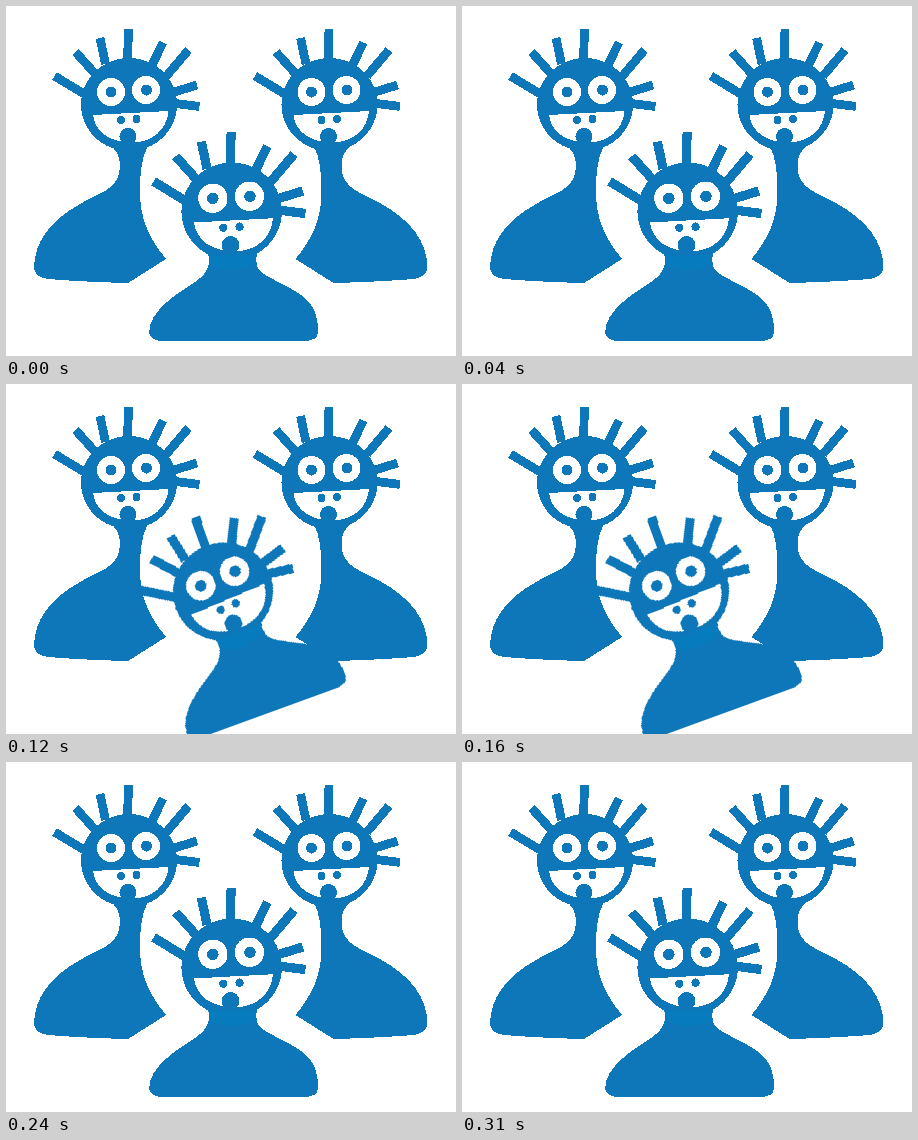
An HTML page without scripts for the animation above (360 ms loop, 450 px wide and 350 px high).

```html
<!DOCTYPE html>
<html lang="en">
<head>
<meta charset="utf-8">
<title>Three spiky friends</title>
<style>
  html, body { margin: 0; width: 100%; height: 100%; overflow: hidden; background: #fff; }
  svg { display: block; width: 450px; height: 350px; fill: #0d77b9; shape-rendering: crispEdges; }
  .hair { stroke: #0d77b9; stroke-width: 8.8; }
  .white { fill: #fff; }
  .throat { fill: #067bbd; }
  .rocker { transform-origin: 227.5px 231px; animation: rock 360ms step-end infinite; }
  @keyframes rock {
    0%, 66.667%, 100% { transform: rotate(0deg); }
    16.667%, 50% { transform: rotate(-10deg); }
    33.333% { transform: rotate(-20deg); }
  }
</style>
</head>
<body>
<svg viewBox="0 0 450 350">
  <defs>
    <g id="head">
      <path class="hair" d="M48.500 70L84 91.500M69.500 46L92 71M94 32L99.500 58M122.500 23L121.500 56M157 36.500L145 61M182.500 44L160.500 70M191 79L165 87M193.500 100.500L166 97"/>
      <ellipse cx="123" cy="98.500" rx="48" ry="46.500"/>
      <g class="white">
        <circle cx="105" cy="86" r="14"/>
        <circle cx="140" cy="84" r="14"/>
        <path d="M87 109L162.500 105C161 123 147 136.500 126 136.500C104 136.500 89 126 87 109Z"/>
      </g>
      <circle cx="105" cy="86" r="5.500"/>
      <circle cx="140.500" cy="84" r="5.500"/>
      <circle cx="115" cy="114" r="4"/>
      <circle cx="130.500" cy="113" r="4"/>
      <circle cx="122" cy="130.500" r="8.500"/>
    </g>
    <path id="side-body" d="M103 138C111 145 114 150 114 160C114 184 92 187 74 198C45 214 28 236 28 262Q29 271 42 273Q80 276 122 277L160 253C142 231 134 212 134 185C134 165 136 150 142 140Z"/>
  </defs>

  <use href="#side-body"/>
  <use href="#head"/>
  <use href="#side-body" transform="translate(449.500) scale(-1 1)"/>
  <use href="#head" x="200.500"/>

  <g class="rocker">
    <use href="#head" transform="translate(96.900 102) scale(1.047 1.050)"/>
    <path d="M202 246C204 256 203 262 198 268C192 276 173 285 161 296C149 306 143 317 143 327Q144 334 155 335Q228 336 300 335Q311 334 312 327C312 314 310 304 303 296C289 281 263 274 253 264C250 259 250 253 251 246Z"/>
    <path class="throat" d="M203 249H250Q250 258 243 261Q226 267 209 261Q203 258 203 249Z"/>
  </g>
</svg>
</body>
</html>
```
